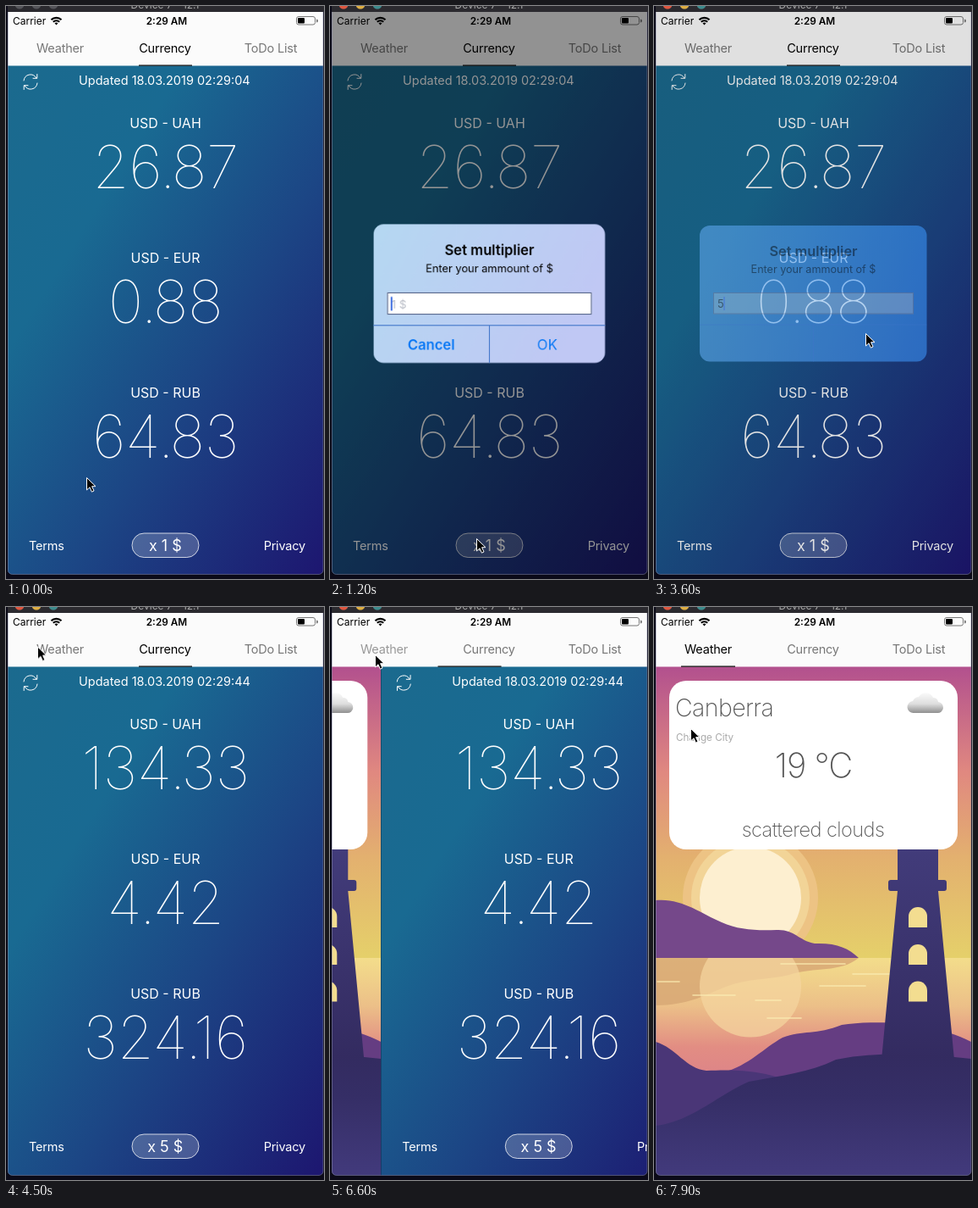
Write an HTML page that moves like this. It is 376x676 px and loops after 8000 ms.

```html
<!DOCTYPE html>
<html lang="en">
<head>
<meta charset="utf-8">
<title>Currency and weather</title>
<style>
html, body { margin: 0; width: 100%; height: 100%; overflow: hidden; background: #0b0a18; }
svg { display: block; width: 376px; height: 676px; font-family: Inter, Roboto, sans-serif; }
text { white-space: pre; }
.mid { text-anchor: middle; }
.label { font-size: 14.5px; letter-spacing: -.2px; }
.pair { font-size: 16px; }
.rate { font-size: 70px; font-weight: 100; letter-spacing: -.5px; }
.thin { font-weight: 200; fill: #555; }

/* one shared 8 s clock: 1.25% is 100 ms */
.anim, .before, .after, .empty, .typed { animation: 8s linear infinite; }
.before { animation-name: before; animation-timing-function: step-end; }
.after { animation-name: after; animation-timing-function: step-end; }
.empty { animation-name: empty; animation-timing-function: step-end; }
.typed { animation-name: typed; animation-timing-function: step-end; }
@keyframes before { 0% { visibility: visible } 47.5%, 100% { visibility: hidden } }
@keyframes after { 0% { visibility: hidden } 47.5%, 100% { visibility: visible } }
@keyframes empty { 0% { visibility: visible } 25%, 100% { visibility: hidden } }
@keyframes typed { 0% { visibility: hidden } 25%, 100% { visibility: visible } }

#lights { animation-name: lights; animation-timing-function: step-end; }
@keyframes lights { 0% { opacity: 0 } 12.5%, 100% { opacity: 1 } }

#dim { animation-name: dim; }
@keyframes dim {
  0%, 12.5% { opacity: 0 } 15% { opacity: .42 } 17.5%, 42.5% { opacity: .47 }
  45% { opacity: .11 } 46.25%, 100% { opacity: 0 }
}
#alert { animation-name: pop; transform-origin: 188.5px 339px; }
@keyframes pop {
  0%, 12.5% { transform: scale(1.15) } 13.75% { transform: scale(1.07) }
  15% { transform: scale(1.02) } 17.5%, 100% { transform: scale(1) }
}
#glow { animation-name: glow; }
@keyframes glow { 0%, 42.4% { opacity: 0 } 42.5% { opacity: .8 } 45% { opacity: .57 } 46.25%, 100% { opacity: 0 } }
#panel { animation-name: panel; }
@keyframes panel { 0%, 12.5% { opacity: 0 } 15%, 42.5% { opacity: 1 } 43.75% { opacity: .45 } 45%, 100% { opacity: 0 } }
#details { animation-name: details; }
@keyframes details { 0%, 12.5% { opacity: 0 } 15%, 42.5% { opacity: 1 } 45% { opacity: .45 } 46.25%, 100% { opacity: 0 } }

#pages { animation-name: slide; }
@keyframes slide {
  0%, 81.25% { transform: translateX(0) } 82.5% { transform: translateX(57px) }
  83.75% { transform: translateX(186px) } 85% { transform: translateX(316px) }
  86.25%, 100% { transform: translateX(373px) }
}
#bar { animation-name: bar; }
@keyframes bar {
  0%, 81.25% { x: 157px; width: 63px } 82.5% { x: 128px; width: 75px }
  83.75% { x: 80px; width: 82px } 85% { x: 44px; width: 72px }
  86.25%, 100% { x: 32px; width: 64px }
}
#tabCurrency { animation-name: leave; animation-timing-function: step-end; }
#tabWeather { animation-name: enter; animation-timing-function: step-end; }
@keyframes leave { 0% { fill: #000 } 81.25%, 100% { fill: #777 } }
@keyframes enter { 0% { fill: #777 } 81.25% { fill: #999 } 83.75%, 100% { fill: #000 } }

#pointer { animation-name: point; }
@keyframes point {
  0% { transform: translate(95px, 556px); animation-timing-function: ease-in-out }
  10%, 31.25% { transform: translate(173px, 628px); animation-timing-function: ease-in-out }
  40%, 46.25% { transform: translate(250px, 386px); animation-timing-function: ease-in-out }
  55%, 70% { transform: translate(37px, 46.5px); animation-timing-function: ease-in-out }
  80%, 88% { transform: translate(53px, 56px); animation-timing-function: ease-in-out }
  98.75%, 100% { transform: translate(43px, 143px) }
}
</style>
</head>
<body>
<svg viewBox="0 0 376 676">
  <defs>
    <linearGradient id="deep" x2="1" y2="1">
      <stop offset="0" stop-color="#1b6a8e"/><stop offset=".28" stop-color="#196a92"/>
      <stop offset=".6" stop-color="#1c4685"/><stop offset="1" stop-color="#1d1670"/>
    </linearGradient>
    <linearGradient id="sky" x2="0" y2="1">
      <stop offset="0" stop-color="#b2508e"/><stop offset=".36" stop-color="#e08880"/>
      <stop offset=".65" stop-color="#e3b06f"/><stop offset="1" stop-color="#e5d06a"/>
    </linearGradient>
    <linearGradient id="sea" x2="0" y2="1">
      <stop offset="0" stop-color="#f3dd8b"/><stop offset=".4" stop-color="#ecc088"/>
      <stop offset=".75" stop-color="#e28d83"/><stop offset="1" stop-color="#dd8488"/>
    </linearGradient>
    <linearGradient id="ground" x2="0" y2="1">
      <stop offset="0" stop-color="#332b60"/><stop offset=".35" stop-color="#352e66"/>
      <stop offset="1" stop-color="#423a7c"/>
    </linearGradient>
    <linearGradient id="tower" x2="0" y2="1">
      <stop offset="0" stop-color="#423c7b"/><stop offset="1" stop-color="#332b60"/>
    </linearGradient>
    <linearGradient id="frost" x2="1" y2=".3">
      <stop offset="0" stop-color="#b5d8f2"/><stop offset="1" stop-color="#c0c8f4"/>
    </linearGradient>
    <linearGradient id="blue" x2="1">
      <stop offset="0" stop-color="#64acf4"/><stop offset="1" stop-color="#3c98ff"/>
    </linearGradient>
    <linearGradient id="puff" x2="0" y2="1">
      <stop offset="0" stop-color="#fafafa"/><stop offset=".55" stop-color="#dedede"/>
      <stop offset="1" stop-color="#8f8f8f"/>
    </linearGradient>
    <clipPath id="screen"><path d="M2 7H375V665.5a5 5 0 0 1-5 5H7a5 5 0 0 1-5-5Z"/></clipPath>
    <clipPath id="view"><rect x="2" y="70.5" width="373" height="600.5"/></clipPath>
    <clipPath id="water"><rect x="2" y="414" width="373" height="140"/></clipPath>
    <path id="window" d="M301 378V365a11 11 0 0 1 22 0V378Z" fill="#f3dd90"/>
  </defs>

  <rect width="376" height="676" fill="#0b0a18"/>
  <rect x="2" width="374" height="7" fill="#2b2a2f"/>
  <g fill="#55555a"><circle cx="16" cy="-2" r="5.5"/><circle cx="36" cy="-2" r="5.5"/><circle cx="56" cy="-2" r="5.5"/></g>
  <g id="lights" class="anim">
    <circle cx="16" cy="-2" r="5.5" fill="#e0563f"/><circle cx="36" cy="-2" r="5.5" fill="#dfae42"/>
    <circle cx="56" cy="-2" r="5.5" fill="#3d8c8e"/>
  </g>
  <text class="mid" x="188" y="2.5" font-size="12" fill="#aaa">Device 7 - 12.1</text>

  <g clip-path="url(#screen)">
    <g clip-path="url(#view)">
      <g id="pages" class="anim">
        <g id="currency" fill="#fff">
          <rect x="2" y="70" width="373" height="601" fill="url(#deep)"/>
          <g fill="none" stroke="#fff" stroke-linecap="round" stroke-linejoin="round">
            <path d="M21 88a8 8 0 0 1 14.8-3.2M37 91a8 8 0 0 1-14.8 3.2"/>
            <path d="M36.8 80.5V85.3H32M21.2 98.5V93.7H26"/>
          </g>
          <g class="label" style="letter-spacing:0">
            <text class="before" x="86" y="93">Updated 18.03.2019 02:29:04</text>
            <text class="after" x="86" y="93">Updated 18.03.2019 02:29:44</text>
          </g>
          <g class="pair mid">
            <text x="188.5" y="143.5">USD - UAH</text>
            <text x="188.5" y="302.5">USD - EUR</text>
            <text x="188.5" y="461.5">USD - RUB</text>
          </g>
          <g class="rate mid before">
            <text x="188.5" y="215">26.<tspan dx="-3">87</tspan></text>
            <text x="188.5" y="374.3">0.<tspan dx="-3">88</tspan></text>
            <text x="188.5" y="533.3">64.<tspan dx="-3">83</tspan></text>
          </g>
          <g class="rate mid after">
            <text x="188.5" y="215">134.<tspan dx="-3">33</tspan></text>
            <text x="188.5" y="374.3">4.<tspan dx="-3">42</tspan></text>
            <text x="188.5" y="533.3">324.<tspan dx="-3">16</tspan></text>
          </g>
          <text class="label" x="27" y="642">Terms</text>
          <text class="label" x="354" y="642" text-anchor="end">Privacy</text>
          <rect x="149" y="622" width="79" height="28.5" rx="14.2" fill-opacity=".2" stroke="#fff" stroke-opacity=".75"/>
          <g class="mid" font-size="18">
            <text class="before" x="188.3" y="643">x 1 $</text>
            <text class="after" x="188.3" y="643">x 5 $</text>
          </g>
        </g>

        <g id="weather" transform="translate(-373)">
          <rect x="2" y="70" width="373" height="345" fill="url(#sky)"/>
          <circle cx="114" cy="343" r="80" fill="#edc384"/>
          <circle cx="114" cy="343" r="70" fill="#f2d497"/>
          <circle cx="114" cy="343" r="60" fill="#fdefd0"/>
          <path fill="#75488a" d="M2 346C32 343 55 361 80 372C100 381 122 382 145 381C166 380 170 393 190 397C215 396 230 402 242 414H2Z"/>
          <rect x="2" y="414" width="373" height="140" fill="url(#sea)"/>
          <path fill="#d9a876" opacity=".85" d="M2 470C40 470 62 457 85 448C110 438 135 440 160 434C190 424 220 432 242 414H2Z"/>
          <circle cx="114" cy="447.5" r="60" fill="#f6d6a0" opacity=".72" clip-path="url(#water)"/>
          <path d="M150 421H226M235 433H284M4 442H30M46 458H96M120 464H150M134 485H174M196 447H250"
            stroke="#fbeeb4" stroke-width="1.6" stroke-linecap="round" opacity=".8"/>
          <path fill="#653d82" d="M82 549C112 541 130 520 152 508C176 499 192 505 222 493C262 487 330 489 375 513V600H82Z"/>
          <path fill="#4a3677" d="M2 513C26 520 38 545 62 547C108 545 130 549 156 558V640H2Z"/>
          <path fill="url(#tower)" d="M288 280H336V322H343a3 3 0 0 1 3 3V332a3 3 0 0 1-3 3H336L355 534H269L288 335H280a3 3 0 0 1-3-3V325a3 3 0 0 1 3-3H288Z"/>
          <use href="#window"/><use href="#window" y="44"/><use href="#window" y="87.5"/>
          <path fill="url(#ground)" d="M2 612C44 607 72 578 112 560C150 553 184 549 215 534C262 524 320 527 375 533V671H2Z"/>
          <rect x="18" y="87" width="341" height="199" rx="20" fill="#fff"/>
          <path fill="url(#puff)" d="M307 125a7 7 0 0 1-1-14a8 8 0 0 1 7-5a9.5 9.5 0 0 1 17 1a6 6 0 0 1 6 5a6.5 6.5 0 0 1-1 13Z"/>
          <text class="thin" x="25" y="128.5" font-size="28.5" letter-spacing="-.6">Canberra</text>
          <text x="26" y="157.5" font-size="11.7" fill="#aaa">Change City</text>
          <text class="thin mid" x="188.5" y="201" font-size="40" letter-spacing="-1">19 °C</text>
          <text class="thin mid" x="188" y="270.5" font-size="23.5" letter-spacing="-.5">scattered clouds</text>
        </g>
      </g>
    </g>

    <rect x="2" y="7" width="373" height="63.5" fill="#fbfbfb"/>
    <text x="8" y="21.5" font-size="12">Carrier</text>
    <path d="M53.5 16.3a8.5 8.5 0 0 1 12 0M55.8 18.8a5.3 5.3 0 0 1 7.4 0" fill="none" stroke="#000" stroke-width="2.2"/>
    <path d="M57.5 20.3a3 3 0 0 1 4 0L59.5 22.5Z"/>
    <text class="mid" x="190" y="21.5" font-size="11.8" font-weight="600">2:29 AM</text>
    <rect x="343.5" y="12.5" width="22" height="9.5" rx="2.5" fill="none" stroke="#777"/>
    <rect x="345" y="14" width="8" height="6.5" rx="1"/>
    <path d="M367 15.5a2 2 0 0 1 0 4Z" fill="#777"/>
    <g class="label mid" fill="#777">
      <text id="tabWeather" class="anim" x="64" y="54.5">Weather</text>
      <text id="tabCurrency" class="anim" x="188" y="54.5">Currency</text>
      <text x="313" y="54.5">ToDo List</text>
    </g>
    <rect id="bar" class="anim" x="157" y="69.5" width="63" height="1.2"/>

    <rect id="dim" class="anim" x="2" y="7" width="373" height="664"/>
    <g id="alert" class="anim">
      <g id="glow" class="anim">
        <rect x="54" y="259" width="268.5" height="160.5" rx="12" fill="url(#blue)"/>
        <rect x="70" y="338" width="237" height="25.5" fill="#cbe8ff" opacity=".6"/>
      </g>
      <g id="panel" class="anim">
        <rect x="54" y="259" width="268.5" height="160.5" rx="12" fill="url(#frost)"/>
        <rect x="70" y="338" width="237" height="25.5" fill="#fff"/>
        <g class="mid" font-size="16.3" fill="#0a78f5">
          <text x="121" y="404" font-weight="600">Cancel</text>
          <text x="255.5" y="404">OK</text>
        </g>
      </g>
      <g id="details" class="anim">
        <text class="mid" x="188.5" y="294.5" font-size="16.3" font-weight="600">Set multiplier</text>
        <text class="mid" x="188.5" y="314.5" font-size="12.6">Enter your ammount of $</text>
        <rect x="70.5" y="338.5" width="236" height="24.5" fill="none" stroke="#44557f"/>
        <path d="M54 376H322.5M188.5 376V419.5" fill="none" stroke="#3f74c8"/>
        <g font-size="13">
          <text class="empty" x="75" y="356" fill="#bbbfc8">1 $</text>
          <rect class="empty" x="74" y="343" width="2" height="16" fill="#3f6fe0"/>
          <text class="typed" x="75" y="356">5</text>
          <rect class="typed" x="82" y="343" width="2" height="16" fill="#3f6fe0"/>
        </g>
      </g>
    </g>
  </g>
  <path d="M2.5 7V665.5a5 5 0 0 0 5 5H370a5 5 0 0 0 5-5V7" fill="none" stroke="#8a8ca8" stroke-opacity=".5"/>
  <g id="pointer" class="anim">
    <path d="M.5.5V15L4 11.8L6.400 17.2L9 16L6.600 10.7H11Z" stroke="#fff" stroke-linejoin="round"/>
  </g>
</svg>
</body>
</html>
```
